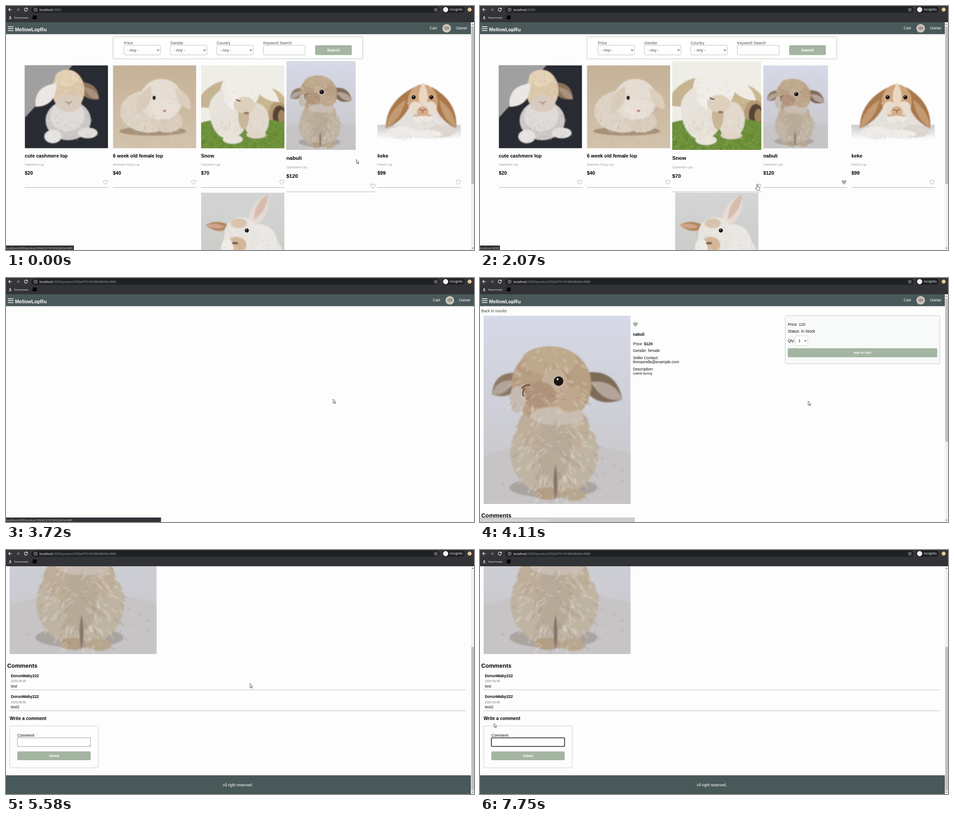
These frames come from a looping animation (1034x541 px, 8 s). An HTML page:

```html
<!DOCTYPE html>
<html lang="en">
<head>
<meta charset="utf-8">
<title>Rabbit shop</title>
<style>
  html, body { margin: 0; width: 100%; height: 100%; overflow: hidden; background: #fdfdfd; }
  svg { display: block; }
  text { font-family: "Liberation Sans", Arial, sans-serif; white-space: pre; }
  .ui { font-family: "Open Sans", "Noto Sans", sans-serif; }
  .serif { font-family: "Liberation Serif", "Times New Roman", serif; }
  .b { font-weight: bold; }
  .mid { text-anchor: middle; }
</style>
</head>
<body>
<svg id="stage" width="1034" height="541" viewBox="0 0 1034 541"></svg>
<script>
const LOOP = 8000;
const SLATE = '#495859', SAGE = '#a4b5a2', EDGE = '#a3b3aa', FAINT = '#9a9f9b';
const BODY = 8.62, TITLE = 10.77, SMALL = 6.46;
const ITEM = '/product/5f2e07614f18f628b5bcf889';
const HEART = 'M0 4.6C-7-.5-4.6-4.4-2.5-4.4Q-.8-4.4 0-2.8Q.8-4.4 2.5-4.4C4.6-4.4 7-.5 0 4.6Z';

// ---- drawing helpers ----
const text = (x, y, s, size = BODY, cls = '', fill = '#111') =>
  `<text x="${x}" y="${y}" font-size="${size}" class="${cls}" fill="${fill}">${s}</text>`;
const rect = (x, y, w, h, fill, r = 0, stroke = 'none') =>
  `<rect x="${x}" y="${y}" width="${w}" height="${h}" rx="${r}" fill="${fill}" stroke="${stroke}" stroke-width=".8"/>`;
const oval = (x, y, rx, ry, fill) => `<ellipse cx="${x}" cy="${y}" rx="${rx}" ry="${ry}" fill="${fill}"/>`;
const path = (d, fill) => `<path d="${d}" fill="${fill}"/>`;
const line = (d, stroke, w = 1) => `<path d="${d}" fill="none" stroke="${stroke}" stroke-width="${w}"/>`;
const rule = (x, y, w, c = '#bdbdbd') => line(`M${x} ${y}h${w}`, c);
const heart = (x, y, id, fill = 'none', stroke = FAINT) =>
  `<path id="${id}" d="${HEART}" transform="translate(${x} ${y})" fill="${fill}" stroke="${stroke}" stroke-width=".9"/>`;
const chevron = (x, y) => line(`M${x - 2.2} ${y - 1.2}l2.2 2.4 2.2-2.4`, '#333', 1.1);

// ---- photo helpers ----
let seed = 7;
const rnd = () => (seed = seed * 16807 % 2147483647) / 2147483647;
const many = (n, make) => Array.from({ length: n }, make).join('');

// Short random hairs that fan out from the middle of an oval.
const hairs = (x, y, rx, ry, stroke, density = .05) => line(many(rx * ry * density, () => {
  const a = rnd() * 2 * Math.PI, r = Math.sqrt(rnd()), c = Math.cos(a), s = Math.sin(a);
  return `M${(x + rx * r * c).toFixed(1)} ${(y + ry * r * s).toFixed(1)}l${(c * 4).toFixed(1)} ${(3 + s * 4).toFixed(1)}`;
}), stroke);
const coat = (x, y, rx, ry, fill) =>
  oval(x, y, rx, ry, fill) + hairs(x, y, rx, ry, '#ffffff55') + hairs(x, y, rx, ry, '#60483030', .03);

// A leaf from base to tip, w wide to each side.
const ear = (x, y, tx, ty, w, fill) => {
  const dx = tx - x, dy = ty - y, k = 2 * w / Math.hypot(dx, dy);
  const side = s => `${x + dx * .55 - dy * k * s} ${y + dy * .55 + dx * k * s}`;
  return path(`M${x} ${y}Q${side(1)} ${tx} ${ty}Q${side(-1)} ${x} ${y}Z`, fill);
};
const lop = (x, y, tx, ty, w, fill, inner) =>
  ear(x, y, tx, ty, w, fill) + ear(x + (tx - x) * .3, y + (ty - y) * .3, tx, ty, w * .5, inner);
const eye = (x, y, r) => oval(x, y, r, r, '#1b1517') + oval(x - 1, y - r * .4, 1, 1, '#ddd');
const mouth = (x, y, c) => line(`M${x - 7} ${y}q7 7 14 0m-7 4v5`, c, 1.5);
const soft = s => `<g filter="url(#soft)">${s}</g>`;
const photo = (x, y, w, h, vw, s) =>
  `<svg x="${x}" y="${y}" width="${w}" height="${h}" viewBox="0 0 ${vw} 184" preserveAspectRatio="none">${s}</svg>`;
const wall = fill => rect(0, 0, 184, 184, fill);

// ---- photos ----
const cashmere = wall('#292b32') + soft(
  path('M-5-5H110L-5 122Z', '#a0a0a0') +
  coat(96, 122, 50, 44, '#cbc8c6') + coat(94, 112, 38, 34, '#dedbd8') +
  coat(62, 158, 19, 15, '#e6e3e0') + coat(139, 150, 22, 12, '#e0ddda') +
  lop(118, 38, 164, 75, 15, '#8d7259', '#a8927f') +
  coat(96, 56, 36, 46, '#dcc7a9') + coat(93, 28, 26, 18, '#e4d1b5') + oval(97, 84, 28, 20, '#d8cbbe') +
  ear(70, 40, 24, 92, 17, '#ebe7e4') + mouth(97, 80, '#8a6b61'));

const fuzzy = wall('url(#sand)') + soft(
  hairs(92, 92, 130, 130, '#a8927a33', .04) + oval(88, 146, 74, 10, '#a8927a') +
  coat(80, 102, 64, 47, '#ddd2c3') + coat(120, 125, 35, 24, '#d9ccba') + coat(107, 76, 47, 46, '#e5ddd2') +
  ear(84, 46, 55, 106, 13, '#d8cbb9') + ear(138, 50, 171, 98, 12, '#dbcebd') + coat(115, 96, 28, 22, '#e8e0d6')) +
  oval(91, 72, 3.5, 4.5, '#3b302d') + oval(114, 101, 4, 3, '#c8988b');

const snow = wall('#eeeee6') + soft(
  ear(-15, 90, 95, 40, 26, '#c5b492') + coat(135, 92, 55, 45, '#c8b68f') +
  oval(170, 111, 22, 31, '#b59a74') + oval(173, 112, 15, 23, '#574536') + oval(178, 114, 8, 15, '#a08560') +
  oval(92, 170, 150, 54, '#6d903a') +
  hairs(92, 170, 130, 52, '#9dbb5c99', .07) + hairs(92, 174, 130, 48, '#3f611899', .07) +
  coat(62, 108, 42, 55, '#e6e1d8') + coat(122, 122, 28, 38, '#e2d9cc') + oval(94, 112, 12, 30, '#c9b698') +
  coat(70, 164, 22, 10, '#eae3da') + coat(122, 154, 22, 8, '#e2d6c7') +
  coat(86, 57, 43, 44, '#f0ede8') + oval(96, 88, 24, 18, '#ddd0bd') +
  ear(48, 52, 22, 118, 15, '#e9e4db') + ear(108, 30, 173, 82, 14, '#f0ebe5')) +
  line('M78 75q4 6 9 3', '#554640', 2) + oval(100, 106, 6, 3, '#a87f6b');

const nabuli = wall('url(#mist)') + soft(
  oval(75, 190, 130, 65, '#c6c4c5') + many(22, () => oval(rnd() * 143, 138 + rnd() * 44, .8, .6, '#a09a92')) +
  oval(68, 168, 43, 10, '#aaa4a0') +
  coat(69, 134, 43, 42, '#bfb3a2') + coat(68, 110, 35, 26, '#beae99') + coat(69, 130, 16, 32, '#b8aa98') +
  coat(62, 174, 13, 6, '#b29f86') + coat(87, 175, 12, 6, '#b7a78f') + ear(70, 145, 70, 180, 2, '#85766a') +
  lop(38, 57, 8, 77, 10, '#8c7865', '#b2a498') + lop(92, 57, 135, 82, 13, '#7f6c59', '#b4a59a') +
  coat(66, 68, 39, 38, '#b79f83') + coat(64, 44, 27, 14, '#bfa98d') + oval(69, 63, 12, 10, '#c3b09a') +
  coat(53, 77, 17, 13, '#b0937a') + coat(72, 98, 27, 9, '#c8bdb0') + coat(33, 82, 8, 13, '#c5bbb2') +
  coat(84, 82, 14, 12, '#bfa78d')) +
  eye(73, 64, 4.6) + line('M37 71q4-4 8-3m-5 3q-3 4-1 8', '#664c40', 1.2);

const keke = soft(
  rect(-5, 132, 194, 32, 'url(#floor)') +
  coat(96, 124, 60, 37, '#e4e0dc') + coat(55, 150, 35, 14, '#efebe7') +
  coat(142, 146, 30, 14, '#ddd6cf') + coat(110, 153, 32, 10, '#efece8') +
  lop(82, 48, 18, 140, 17, '#a9794e', '#c39a72') + lop(120, 48, 174, 140, 17, '#a97748', '#c39a72') +
  coat(100, 80, 33, 38, '#cfa47a') + ear(101, 38, 101, 98, 10, '#ead8c2') +
  coat(84, 95, 14, 15, '#e9ddd0') + coat(117, 95, 14, 15, '#e9ddd0') +
  oval(100, 103, 13, 12, '#d5ac89') + coat(100, 119, 23, 7, '#eee8e2')) +
  eye(80, 71, 4.5) + eye(119, 71, 4.5) + mouth(100, 97, '#8a5c4c');

const sixth = wall('url(#grey)') + soft(
  coat(119, 140, 63, 52, '#e6e4e1') + coat(128, 110, 40, 40, '#eae7e4') +
  lop(104, 84, 147, 4, 17, '#e6dad2', '#d6bcac') + lop(70, 78, 10, 72, 10, '#b0875f', '#d1a58b') +
  coat(89, 95, 39, 41, '#e8e4df') + oval(83, 68, 18, 11, '#d8c4ae') + coat(78, 116, 22, 18, '#d3b798') +
  coat(58, 124, 14, 22, '#eeebe8')) +
  eye(101, 84, 4.5) + oval(75, 112, 7, 3, '#8f6b58');

// ---- pages ----
const header = `${rect(0, 36, 1034, 26.5, SLATE)}
  ${line('M4 46h12.5M4 50.3h12.5M4 54.6h12.5', '#fff', 1.5)}
  ${text(20, 55.5, 'MellowLopRu', TITLE, 'b', '#fff')}
  <g id="account">${text(936, 51.6, 'Cart', BODY, '', '#fff')}
  ${oval(973.6, 49.5, 9.6, 9.6, '#c9c5bf')}${oval(974, 49, 6, 4, '#a3988c')}
  ${text(994, 51.6, 'Owner', BODY, '', '#fff')}</g>`;

const choice = (label, i) => {
  const x = 260.6 + 102.5 * i;
  return text(x, 84.5, label, BODY, '', '#4d5350') + rect(x, 87, 80.7, 21.5, '#fff', 2.5, EDGE) +
    text(x + 7.5, 100.8, '- Any -', BODY, '', '#444') + chevron(x + 75.5, 97.8);
};

const left = i => 41.5 + 194.8 * i;
const card = ([name, breed, price, shot, w = 184], i) => {
  const x = left(i);
  return `<g id="card${i}">${photo(x, 131.5, w, 184, w, shot)}
    ${text(x, 336, name, TITLE, 'b', '#000')}${text(x, 354, breed, SMALL, '', '#999')}
    ${text(x, 374, price, TITLE, 'b', '#000')}${heart(x + 178.5, 390.6, 'heart' + i)}
    ${rule(x, 402.5, 184.3, '#a7b2ac')}</g>`;
};

const home = `${rect(236.3, 68.5, 552, 48.7, '#fff', 3, EDGE)}
  ${['Price', 'Gender', 'Country'].map(choice).join('')}
  ${text(568.3, 85, 'Keyword Search', BODY, '', '#4d5350')}${rect(568.5, 87.3, 92.5, 21.2, '#fff', 2.5, EDGE)}
  ${rect(683, 87, 81, 21.7, SAGE, 2.5)}${text(723.5, 101, 'Search', BODY, 'b mid', '#fff')}
  ${photo(left(2), 413.8, 184, 184, 184, sixth)}
  ${[['cute cashmere lop', 'Cashmere Lop', '$20', cashmere],
    ['6 week old female lop', 'American Fuzzy Lop', '$40', fuzzy],
    ['Snow', 'Cashmere Lop', '$70', snow],
    ['nabuli', 'Cashmere Lop', '$120', nabuli, 143],
    ['keke', 'French Lop', '$99', keke]].map(card).join('')}`;

const comment = (words, i) => {
  const y = 552.3 + 46.5 * i;
  return text(10.8, y, 'DorunMaby222', BODY, 'b', '#000') + text(10.8, y + 11.2, '2020-08-08', SMALL, '', '#777') +
    text(10.8, y + 23, words) + rule(8, y + 28.2, 1008);
};

const detail = `${text(2.7, 75.8, 'Back to results', BODY, '', '#444')}
  ${photo(8, 83.5, 324.5, 417.5, 143, nabuli)}${heart(343.5, 102.7, 'liked', SAGE, SAGE)}
  ${text(338, 127.6, 'nabuli', BODY, 'b', '#000')}
  ${['Price: <tspan class="b">$120</tspan>', 'Gender: female', 'Seller Contact:']
    .map((s, i) => text(338, 149.3 + 15.1 * i, s)).join('')}
  ${text(338, 189.3, 'linmaorella@example.com')}${text(338, 204.5, 'Description:')}
  ${text(338, 213.8, 'cutest bunny', 7.54)}
  ${rect(674.4, 83.5, 341.5, 106.7, '#f8faf9', 3, '#b3beb8')}
  ${text(680, 105.5, 'Price: 120')}${text(680, 120.7, 'Status: In Stock')}${text(680, 142.3, 'Qty:')}
  ${rect(696.4, 128.3, 27.8, 21.9, '#fff', 2.5, '#c4cbc7')}${text(703.4, 142.2, '1')}${chevron(718.8, 139.2)}
  ${rect(680, 155.8, 330.2, 20, SAGE, 2.5)}${text(845, 168.4, 'Add to Cart', 7.18, 'b mid', '#fff')}
  ${text(2.7, 531.3, 'Comments', 12.92, 'b', '#000')}
  ${['test', 'test2'].map(comment).join('')}
  ${text(8, 647, 'Write a comment', 10.08, 'b', '#000')}
  ${rect(8.4, 660.4, 195.5, 93, '#fdfdfd', 3, '#bdbdbd')}${text(25, 684.4, 'Comment')}
  <rect id="field" x="25.2" y="687.1" width="161.6" height="18.8" fill="#fff"/>
  ${line('M183 705l3-3M185 705l1-1', '#888', .6)}
  ${rect(25, 717, 162, 19.6, SAGE, 2.5)}${text(106.2, 729.4, 'Submit', 7.4, 'serif b mid', '#fff')}
  ${rect(0, 770, 1034, 42, SLATE)}${text(512, 794, 'All right reserved.', BODY, 'mid', '#fff')}`;

const browser = `${rect(0, 0, 1034, 36, '#323337')}${rect(0, 0, 1034, 16, '#35363a')}
  ${rect(56, 1, 902, 14, '#202124', 7)}
  ${line('M13 8H6M9.2 4.6L5.8 8l3.4 3.4', '#f1f1f1', 1.2)}${line('M22.5 8h7M26.3 4.6L29.7 8l-3.4 3.4', '#85878a', 1.1)}
  ${line('M46.6 5.6a3.5 3.5 0 1 0 .8 3.2', '#f1f1f1', 1.2)}${path('M47.8 3.8v3.6h-3.6Z', '#f1f1f1')}
  <circle cx="65.3" cy="8" r="3.4" fill="none" stroke="#d5d7da" stroke-width=".9"/>${line('M65.3 7.5v2.4M65.3 5.8v.9', '#d5d7da', .9)}
  <text class="ui" x="74" y="10.7" font-size="7.1" fill="#fff">localhost<tspan fill="#9aa0a6">:3000<tspan id="route"></tspan></tspan></text>
  ${line('M949.6 4.2l1.1 2.6 2.8.2-2.1 1.9.6 2.8-2.4-1.5-2.4 1.5.6-2.8-2.1-1.9 2.8-.2Z', '#d5d7da', .8)}
  ${rect(963, 1, 51, 14, '#202124', 7)}${oval(971.3, 8, 5.7, 5.7, '#f1f3f4')}
  ${text(981, 10.4, 'Incognito', 6.45, 'ui', '#fff')}${oval(1024.3, 8, 4.4, 4.4, '#e6c9a0')}
  ${line('M9.3 22v4.2M7.2 24.3l2.1 2.2 2.1-2.2M6.3 28.5h6', '#f1f1f1', 1.1)}
  ${text(18, 27.8, 'Downloads', 6.1, 'ui', '#f1f1f1')}${rect(59, 21, 8.6, 8.6, '#000')}`;

const shade = (id, from, to) => `<linearGradient id="${id}" x2="0" y2="1">
  <stop stop-color="${from}"/><stop offset="1" stop-color="${to}"/></linearGradient>`;

const $ = id => document.getElementById(id);
$('stage').innerHTML = `<defs>
    <filter id="soft" x="-10%" y="-10%" width="120%" height="120%"><feGaussianBlur stdDeviation=".8"/></filter>
    ${shade('sand', '#c5b298', '#d3c3ac')}${shade('mist', '#d6d9e7', '#c6c4c6')}
    ${shade('floor', '#cbc9c6', '#fdfdfd')}${shade('grey', '#d3d5d4', '#c9c9c6')}
  </defs>
  ${rect(0, 0, 1034, 541, '#fdfdfd')}
  <g id="page">${header}<g id="home">${home}</g><g id="detail">${detail}</g></g>
  <g id="bar">${rect(1027, 36, 7, 505, '#f1f1f1')}${path('M1028.8 41.5l2-2.6 2 2.6ZM1028.8 536l2 2.6 2-2.6Z', '#555')}
    <rect id="thumb" x="1028" width="6" fill="#c1c1c1"/></g>
  ${browser}
  <g id="status"><rect id="strip" y="531" height="10" rx="1" fill="#323338"/>
    <text class="ui" x="0" y="539" font-size="6.15" fill="#d0d3d7">localhost:3000<tspan id="link"></tspan></text></g>
  <g id="cursor" stroke="#2b2b2b" stroke-width=".8" fill="#fff">
    <path d="M0 0V9.2L2.2 7.2 3.7 10.4 5 9.8 3.6 6.8H6Z"/>
    <path d="M-1.2 1a1.2 1.2 0 0 1 2.4 0V5l3 .6q1.2.3 1 1.6l-.6 3.8-.5 1.7H-1.6L-4.2 8.4q-.4-1.3.8-1.2L-1.2 8.6Z"/>
    <path d="M-2-5.5q2 0 2 1.2V4.3q0 1.2-2 1.2M2-5.5Q0-5.5 0-4.3V4.3Q0 5.5 2 5.5" fill="none"/>
  </g>`;

// ---- motion ----
// Pointer stops: start, arrival, x, y
const STOPS = [
  [10, 680, 813, 396], [1390, 1460, 782, 397], [1470, 1920, 613, 396],
  [2930, 3090, 678, 352], [3090, 3320, 722, 267], [3700, 3790, 725, 273],
  [4270, 4650, 588, 284], [4810, 4950, 539, 296], [5660, 5980, 277, 335],
  [6380, 6830, 137, 424], [7450, 7750, 31, 384]
];
const within = (t, a, b) => t >= a && t < b;
const part = (t, a, span) => Math.min(1, Math.max(0, (t - a) / span));
const ease = (t, a, span) => { const p = part(t, a, span); return p * p * (3 - 2 * p); };
const show = (node, on) => node.style.display = on ? '' : 'none';
const set = (id, attrs) => { for (const k in attrs) $(id).setAttribute(k, attrs[k]); };

const pointer = t => STOPS.reduce(([x, y], [a, b, tx, ty]) => {
  const p = part(t, a, b - a);
  return [x + (tx - x) * p, y + (ty - y) * p];
}, [774, 340]);

const pointerKind = t => within(t, 6750, 7550) ? 2 : within(t, 150, 3050) || within(t, 3550, 3720) ? 1 : 0;

// Five wheel notches, one after the other.
const scrollAt = t => {
  let y = 0;
  for (let k = 0; k < 5; k++) y += 54.1 * ease(t, 4810 + 155 * k, 150);
  return y;
};

function drawCard(i, t, hover, likedAt) {
  const s = 1 + .07 * hover, cx = left(i) + 92, on = t >= likedAt;
  set('card' + i, { transform: `translate(${cx} 267) scale(${s}) translate(${-cx} -267)` });
  set('heart' + i, { fill: on ? SAGE : 'none', stroke: on ? SAGE : FAINT });
}

function draw(t) {
  const shop = t < 3720, ready = t >= 4020, scroll = scrollAt(t);
  show($('home'), shop);
  show($('detail'), ready);
  show($('bar'), shop || ready);
  set('page', { transform: `translate(0 ${-scroll})` });
  set('account', { transform: `translate(${shop || ready ? 0 : 7} 0)` });
  set('thumb', { y: 45 + scroll * .628, height: shop ? 350 : 318 });
  $('route').textContent = shop ? '' : ITEM;

  drawCard(2, t, ease(t, 1700, 240) - ease(t, 2995, 240), 2620);
  drawCard(3, t, 1 - ease(t, 1690, 240) + ease(t, 3060, 250), 1140);

  // The link bubble widens after a long hover and fades on the new page.
  const item = t < 300 || t >= 3170, wide = within(t, 830, 1690) || t >= 2540;
  $('link').textContent = item ? ITEM : '';
  set('strip', { width: wide ? 342.5 : item ? 150 : 44 });
  set('status', { opacity: 1 - part(t, 4050, 80) });

  const focus = t >= 7060;
  set('field', { stroke: focus ? '#101010' : '#858585', 'stroke-width': focus ? 1.5 : .8, rx: focus ? 1 : 0 });

  set('cursor', { transform: `translate(${pointer(t)})` });
  [...$('cursor').children].forEach((c, i) => show(c, i === pointerKind(t)));
}

const start = performance.now();
function tick(now) {
  draw(Math.max(0, now - start) % LOOP);
  requestAnimationFrame(tick);
}
draw(0);
requestAnimationFrame(tick);
</script>
</body>
</html>
```
